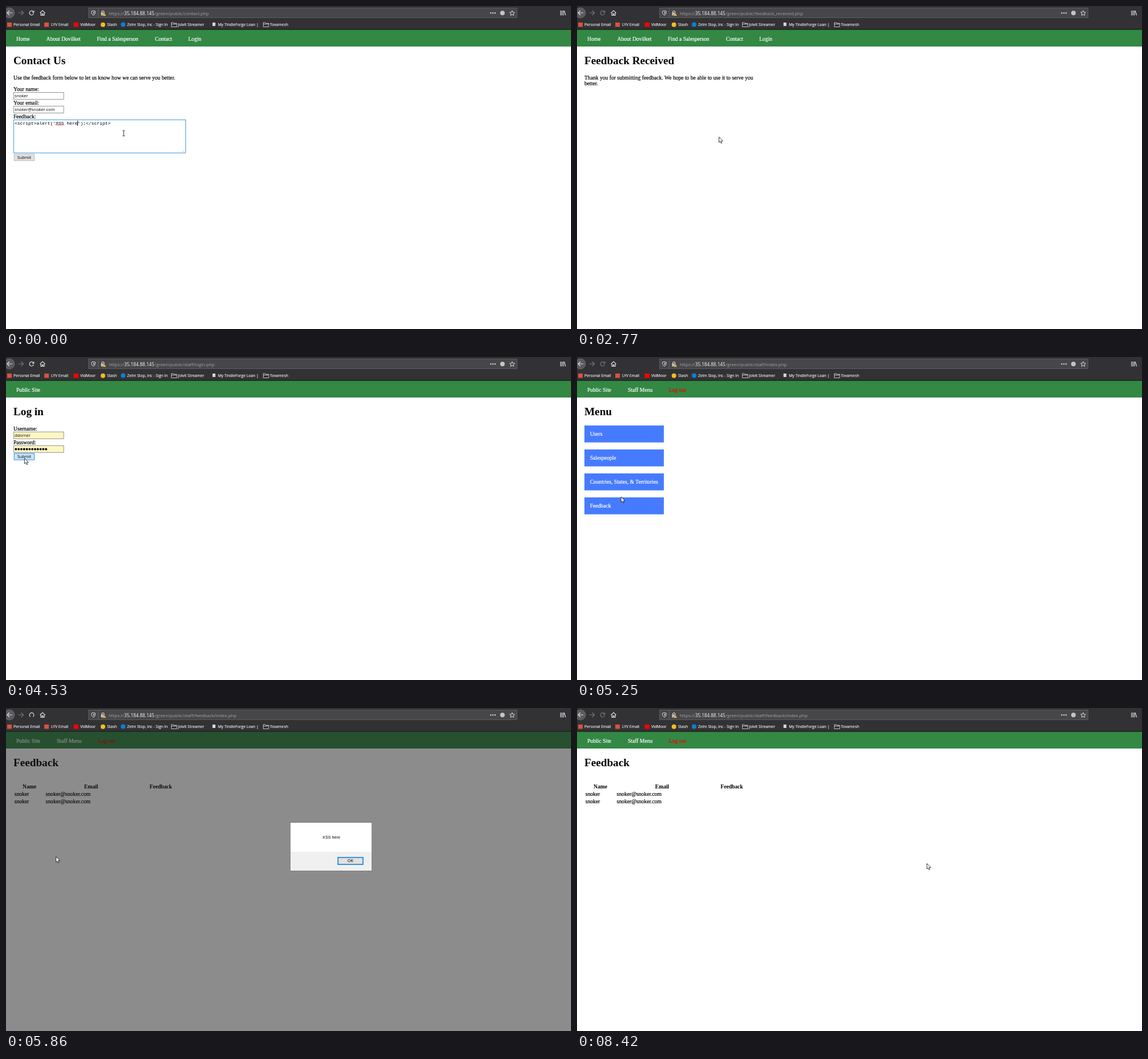
Write an HTML page that moves like this. It is 989x566 px and loops after 8.57 s.

```html
<!DOCTYPE html>
<html lang="en">
<head>
<meta charset="utf-8">
<title>Feedback form</title>
<style>
  html, body { margin: 0; width: 100%; height: 100%; overflow: hidden; background: #fff; }
  svg { display: block; width: 100%; height: 100%; }
  .serif { font: 9.6px "Liberation Serif", Times, serif; stroke: #000; stroke-width: .2; }
  .h1 { font: bold 19.2px "Liberation Serif", Times, serif; }
  .th { font: bold 9.6px "Liberation Serif", Times, serif; text-anchor: middle; }
  .ui { font: 7.4px "Open Sans", "Noto Sans", sans-serif; }
  .mark { font: 6.75px "Open Sans", "Noto Sans", sans-serif; fill: #f9f9fa; stroke: #f9f9fa; stroke-width: .12; }
  .url { font: 7.85px "Open Sans", "Noto Sans", sans-serif; fill: #a3a3a6; }
  .ip { font-size: 8.1px; fill: #f9f9fa; }
  .mono { font: 8px "Liberation Mono", monospace; }
  .sans { font: 7.2px "Liberation Sans", Arial, sans-serif; }
  .mid { text-anchor: middle; }
  .line { fill: none; stroke: #dcdcde; stroke-width: 1.2; }
</style>
</head>
<body>
<svg viewBox="0 0 989 566" xmlns="http://www.w3.org/2000/svg">
  <defs>
    <radialGradient id="glow">
      <stop offset=".6" stop-color="#eef23c" stop-opacity=".65"/>
      <stop offset="1" stop-color="#eef23c" stop-opacity=".2"/>
    </radialGradient>
  </defs>
  <g id="bar"></g>
  <g id="page"></g>
  <g id="pointer"></g>
</svg>
<script>
const LOOP = 8570;
const USER = 'snoker', MAIL = 'snoker@snoker.com';
const GREEN = '#338844', BLUE = '#0078d7';
const TOP = 41.6; // where the browser bar ends

// Screen updates come in bursts: first, last, count
const BURSTS = [[0, 0, 1], [70, 830, 11], [1290, 1290, 1], [1820, 2540, 10], [2770, 3610, 12],
  [3690, 4070, 6], [4240, 5080, 12], [5170, 6020, 12], [6090, 6780, 10], [7870, 8420, 8]];
const TICKS = BURSTS.flatMap(([a, b, n]) =>
  Array.from({ length: n }, (_, i) => Math.floor((a + (b - a) * i / Math.max(1, n - 1)) / 10) * 10));

const PAGES = [[0, 'contact'], [2130, 'received'], [3530, 'login'], [4840, 'menu'], [5860, 'feedback']];
const RELOAD = [[0, 'on'], [1890, 'stop'], [2200, 'off'], [2990, 'on'], [3450, 'stop'], [3600, 'off'],
  [4240, 'on'], [4690, 'stop'], [4840, 'off'], [5470, 'on'], [5860, 'arc'], [6090, 'stop'], [8170, 'off']];
const MOVES = [[0, 206, 223], [830, 36, 269], [2000, 36, 269], [2540, 244, 232], [2770, 248, 229],
  [3230, 330, 57], [3610, 330, 57], [4070, 32, 177], [4840, 32, 177], [5400, 87, 260],
  [6020, 87, 260], [6780, 612, 272], [LOOP, 612, 272]];
const CLICKS = [1820, 3370, 4610, 5550, 7870];
const DIALOG = [5860, 8100];
const PATHS = {
  contact: 'contact.php', received: 'feedback_received.php', login: 'staff/login.php',
  menu: 'staff/index.php', feedback: 'staff/feedback/index.php'
};

const esc = s => s.replace(/&/g, '&amp;').replace(/</g, '&lt;');
const text = (x, y, s, cls = 'serif', fill = '') =>
  `<text x="${x}" y="${y}" class="${cls}"${fill && ` style="fill:${fill};stroke:${fill}"`}>${esc(s)}</text>`;
const rect = (x, y, w, h, fill, stroke = 'none', more = '') =>
  `<rect x="${x}" y="${y}" width="${w}" height="${h}" fill="${fill}" stroke="${stroke}" ${more}/>`;
const path = (d, more = 'class="line"') => `<path d="${d}" ${more}/>`;
const dot = (x, y, r, fill, more = '') => `<circle cx="${x}" cy="${y}" r="${r}" fill="${fill}" ${more}/>`;

const at = (table, t) => table.filter(row => row[0] <= t).pop()[1];
const inside = ([x, y], l, t, w, h) => x >= l && x <= l + w && y >= t && y <= t + h;

function position(t) {
  const i = Math.max(1, MOVES.findIndex(m => m[0] > t));
  const [a, x0, y0] = MOVES[i - 1], [b, x1, y1] = MOVES[i];
  const k = (1 - Math.cos(Math.PI * (t - a) / (b - a))) / 2;
  return [x0 + (x1 - x0) * k, y0 + (y1 - y0) * k];
}

const folder = x => path(`M${x} 36.5V29h3.4l1 1.3h5v6.2zM${x} 31.7h9.4`, 'fill="none" stroke="#d0d0d2" stroke-width=".9"');

function reloadIcon(kind) {
  if (kind === 'stop') return path('M41.3 8.5l7.4 7.4M48.7 8.5l-7.4 7.4', 'class="line" stroke-linecap="round"');
  if (kind === 'arc') return path('M42.6 15.2A3.8 3.8 0 1 1 47.4 15.2');
  return `<g opacity="${kind === 'off' ? .4 : 1}">` +
    path('M47.6 9.7A3.7 3.7 0 1 0 48.4 13.2') + path('M49.3 7.8v4h-4z', 'fill="#dcdcde"') + '</g>';
}

function bar(page, reload) {
  const marks = [[13, 'Personal Email'], [79, 'LYV Email'], [130, 'VidMoor'], [177, 'Stash'],
    [212, 'Zelm Stop, Inc - Sign In'], [301, 'Jolvit Streamer'], [371, 'My TindleForge Loan |'], [462, 'Tovamesh']];
  return rect(0, 0, 989, 41, '#323234') + rect(0, 40.6, 989, 1.4, '#0c0c0d') +
    dot(6, 12, 9, '#5b5b5e', 'stroke="#77777a" stroke-width=".7"') +
    path('M11 12H2M6 8L2 12l4 4') +
    path('M21.5 12h9M26.5 8l4 4-4 4', 'class="line" opacity=".4"') + reloadIcon(reload) +
    path('M59.5 12.3L64 8l4.5 4.3M61 12v4.5h2.2v-3h1.6v3H67V12') +
    rect(144.5, 3.5, 750, 17, '#474749', '#5c5c5f') + rect(161, 4, 1, 16, '#5f5f62') +
    path('M149.6 9.2l3.4-1 3.4 1c0 4-1 5.7-3.4 7.1-2.4-1.4-3.4-3.1-3.4-7.1z', 'class="line" style="stroke-width:1"') +
    path('M153 10v4.5c1.2-.9 1.6-2.2 1.7-4.1z', 'fill="#dcdcde"') +
    path('M167.6 12v-1.5a2 2 0 0 1 4 0V12') + rect(166.3, 11.5, 6.5, 5, '#c4c4c6') +
    path('M172 11.5l3.3 5.7h-6.6z', 'fill="#ffd436" stroke="#474749" stroke-width=".5"') +
    rect(171.7, 13.3, .7, 2, '#474749') +
    text(180, 15.6, 'https://', 'url') + text(206.8, 15.6, '35.184.88.145', 'url ip') +
    text(260, 15.6, '/green/public/' + PATHS[page], 'url') +
    [848.5, 852.3, 856.1].map(x => dot(x, 12.3, 1.2, '#d0d0d2')).join('') +
    dot(869, 12.2, 4, '#c4c4c6') +
    path('M886 8l1.3 2.9 3.1.3-2.3 2.1.6 3.1-2.7-1.6-2.7 1.6.6-3.1-2.3-2.1 3.1-.3z', 'class="line" style="stroke-width:1"') +
    path('M970.8 8v8.5M973.3 8v8.5M975.8 8v8.5M977 8.3l2.6 8') +
    rect(2, 29, 8, 7.5, '#d9523f') + rect(67, 29, 8, 7.5, '#d9523f') +
    rect(118.5, 29, 8.5, 7.5, '#f00') + dot(169.7, 32.7, 4, '#f5bc1f') +
    dot(205, 32.5, 4, '#0b7fd6') + folder(289.5) + rect(361.5, 29, 5, 6, '#d7dbe0') + folder(450.5) +
    marks.map(([x, s]) => text(x, 35.4, s, 'mark')).join('');
}

const field = (y, value, fill = '#fff') =>
  rect(13.5, y, 87.5, 12, fill, '#7a7a7a', 'stroke-width=".8"') + text(15, y + 8.6, value, 'ui');

const button = (y, over) =>
  rect(14.2, y, 35.2, 11.2, over ? '#cce4f7' : '#e1e1e1', over ? BLUE : '#adadad', 'stroke-width=".8"') +
  text(31.9, y + 8.3, 'Submit', 'ui mid');

const nav = items => rect(0, TOP, 989, 71 - TOP, GREEN) +
  items.map(([x, s]) => text(x, 60.6, s, 'serif', s === 'Log out' ? '#f00000' : '#fff')).join('');
const PUBLIC = [[18, 'Home'], [70.5, 'About Dovilket'], [159, 'Find a Salesperson'], [260.8, 'Contact'], [319, 'Login']];
const STAFF = [[18, 'Public Site'], [89, 'Staff Menu'], [160.8, 'Log out']];

const pages = {
  contact(t, p) {
    const caret = t < 1820 && Math.floor((t + 300) / 530) % 2 === 0;
    return nav(PUBLIC) + text(13, 102, 'Contact Us', 'h1') +
      text(13, 128.6, 'Use the feedback form below to let us know how we can serve you better.') +
      text(13, 149, 'Your name:') + field(151.5, USER) +
      text(13, 173, 'Your email:') + field(175.5, MAIL) + text(13, 197, 'Feedback:') +
      rect(13.5, 199.5, 301, 58, '#fff', BLUE, 'stroke-width=".75"') +
      text(15, 208, "<script>alert('XSS here');<\/script>", 'mono') +
      path('M86.5 209.3' + 'l1.2-1.2l1.2 1.2'.repeat(6), 'fill="none" stroke="#e22" stroke-width=".7"') +
      (caret ? rect(125, 201, 1, 9, '#000') : '') +
      path('M308.5 256l4-4M311 256l1.5-1.5', 'stroke="#999" stroke-width=".8" stroke-dasharray="1 .6"') +
      button(259.8, inside(p, 14, 260, 36, 11));
  },
  received: () => nav(PUBLIC) + text(13, 102, 'Feedback Received', 'h1') +
    text(13, 128.6, 'Thank you for submitting feedback. We hope to be able to use it to serve you') +
    text(13, 139.4, 'better.'),
  login: (t, p) => nav(STAFF.slice(0, 1)) + text(13, 102, 'Log in', 'h1') +
    text(13, 128.6, 'Username:') + field(131.2, 'ddornel', '#fdf7c3') +
    text(13, 152.6, 'Password:') + field(155.2, '', '#fdf7c3') +
    Array.from({ length: 12 }, (_, i) => dot(17.3 + i * 4.8, 161.5, 1.9, '#000')).join('') +
    button(169, inside(p, 14, 169, 36, 12)),
  menu: (t, p) => nav(STAFF) + text(13, 102, 'Menu', 'h1') +
    ['Users', 'Salespeople', 'Countries, States, & Territories', 'Feedback'].map((s, i) => {
      const y = 120 + i * 42;
      return rect(13, y, 139, 29.7, inside(p, 13, y, 139, 30) ? '#3366cc' : '#477bff') +
        text(22.7, y + 17.8, s, 'serif', '#fff');
    }).join(''),
  feedback: (t, p) => nav(STAFF) + text(13, 102, 'Feedback', 'h1') +
    [[41, 'Name'], [149, 'Email'], [271, 'Feedback']].map(([x, s]) => text(x, 141, s, 'th')).join('') +
    [154.3, 167.3].map(y => text(14.7, y, USER) + text(69.6, y, MAIL)).join('') +
    (t >= DIALOG[0] && t < DIALOG[1] ? dialog(p) : '')
};

function dialog(p) {
  const over = inside(p, 581, 261, 44, 14);
  return rect(0, TOP, 989, 566 - TOP, 'rgba(26,26,26,.5)') +
    rect(497.5, 200.5, 143, 85, '#fff', '#6f6f6f', 'stroke-width=".8"') +
    rect(498, 252, 142, 33, '#f0f0f0') + text(569.5, 228.8, 'XSS here', 'sans mid') +
    (over ? rect(580.5, 261.5, 45, 13, '#cce4f7', '#1a70b8', 'stroke-width=".9"')
      : rect(581.1, 261.9, 43.8, 12.2, '#e1e1e1', BLUE, 'stroke-width="1.5"')) +
    text(603, 270.4, 'OK', 'sans mid');
}

const SHAPES = {
  arrow: path('M.5.5V10.1L2.7 8.1 4.2 11.6 5.7 11 4.3 7.6H7.3Z', 'fill="#fff" stroke="#111" stroke-width=".8"'),
  hand: path('M-1 1Q-1-.3 0-.3T1 1V4.7L4 5.3Q5 5.6 5 7L4.3 10V12H-1V10.2L-3.7 6.8Q-3.6 5.6-2.4 6L-1 7.2Z',
    'fill="#fff" stroke="#111" stroke-width=".8"'),
  beam: path('M-2-4.7h1.5l.5.5.5-.5H2M-2 4.7h1.5l.5-.5.5.5H2M0-4.2V4.2', 'fill="none" stroke="#111" stroke-width=".9"')
};

function pointer(t, page, p) {
  let kind = 'arrow';
  if (page === 'contact' && inside(p, 14, 200, 300, 57)) kind = 'beam';
  if (page === 'received' && inside(p, 310, 41, 42, 30)) kind = 'hand';
  if (page === 'menu' && [120, 162, 204, 246].some(y => inside(p, 13, y, 139, 30))) kind = 'hand';
  const lit = CLICKS.some(c => t >= c && t < c + 150);
  return (lit ? dot(p[0], p[1], 8, 'url(#glow)') : '') +
    `<g transform="translate(${p[0].toFixed(2)} ${p[1].toFixed(2)})">${SHAPES[kind]}</g>`;
}

const shown = {};
function put(id, html) {
  if (shown[id] !== html) document.getElementById(id).innerHTML = shown[id] = html;
}

const start = performance.now();
function draw() {
  const now = Math.max(0, performance.now() - start) % LOOP;
  const t = TICKS.filter(k => k <= now).pop();
  const page = at(PAGES, t), p = position(t);
  put('bar', bar(page, at(RELOAD, t)));
  put('page', pages[page](t, p));
  put('pointer', pointer(t, page, p));
  requestAnimationFrame(draw);
}
draw();
</script>
</body>
</html>
```
